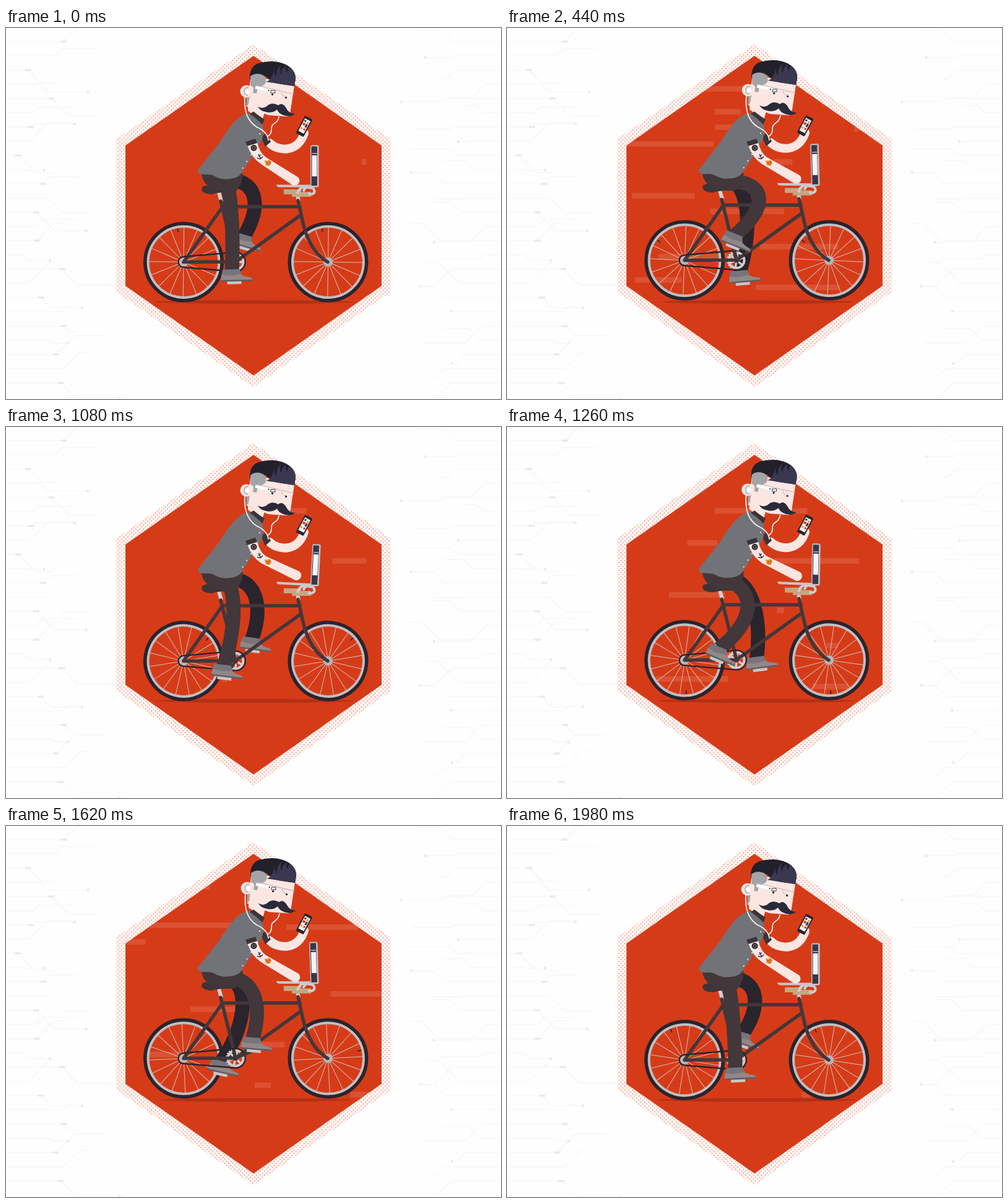
Write an HTML page that moves like this. It is 800 px wide and 600 px high and loops after 2 s.

```html
<!DOCTYPE html>
<html lang="en">
<head>
<meta charset="utf-8">
<title>Cyclist</title>
<style>
html, body { margin: 0; width: 100%; height: 100%; overflow: hidden; background: #fefefe; }
svg { display: block; width: 800px; height: 600px; }
.n { fill: none; }
</style>
</head>
<body>
<svg viewBox="0 0 800 600">
<defs>
  <pattern id="dots" width="6.4" height="6.4" patternUnits="userSpaceOnUse">
    <g fill="#f4b5a6"><circle cx="1.6" cy="1.6" r="1.35"/><circle cx="4.8" cy="4.8" r="1.35"/></g>
  </pattern>
  <clipPath id="hex"><path d="M400 45L607 190V417L400 562L193 417V190Z"/></clipPath>
  <g id="foot">
    <path fill="#c9c6c8" d="M-11-2H12V3H-11Z"/>
    <path fill="#77757b" d="M-18-21H9L13-11H-20Z"/>
    <path fill="#928788" d="M-20-13Q-7-9 11-13Q16-9 24-8Q30-7 30-3H-21Z"/>
    <path fill="#625d63" d="M-21-4H30V-1.5H-21Z"/>
  </g>
  <g id="wheel">
    <circle class="n" r="62" stroke="#2a242d" stroke-width="6"/>
    <circle class="n" r="57.4" stroke="#c2bec0" stroke-width="4"/>
    <g id="spokes" stroke="#d0bdb7"></g>
    <circle r="7.5" fill="#b9b5b8"/>
  </g>
</defs>

<g id="circuit" class="n" stroke="#f5f5f5" stroke-width="1.2"></g>
<path fill="url(#dots)" d="M400 26L622 180V427L400 581L178 427V180Z"/>
<path fill="#d63b18" d="M400 45L607 190V417L400 562L193 417V190Z"/>
<g id="streaks" clip-path="url(#hex)" fill="#fff" fill-opacity=".11"></g>
<path id="shadow" fill="#b33016" d="M-165 0Q-135-3 0-3T165 0Q135 3 0 3T-165 0Z"/>
<use id="rear" href="#wheel"/><use id="front" href="#wheel"/>

<path id="legB" class="n" stroke="#2a242d" stroke-width="23"/>
<use id="footB" href="#foot"/>

<g id="bike">
  <g id="ring" class="n" stroke="#cfcbcd"><circle r="12.5" stroke-width="4"/>
    <circle r="15" stroke-width="2" stroke-dasharray="2.4 2.3"/>
    <path stroke-width="3.5" d="M-11 0H11M-5.5-9.5L5.5 9.5M5.5-9.5L-5.5 9.5"/></g>
  <path class="n" stroke="#d2cfd1" stroke-width="6" d="M344 266L348 280M470 266L473 280"/>
  <g class="n" stroke="#42373a" stroke-width="5.5" stroke-linejoin="round" stroke-linecap="round">
    <path d="M347 280L371 378L287 378.5L350 289H475M477 302L371 378"/>
    <path d="M472 279L480 315Q490 360 520 378.5"/>
  </g>
  <path class="n" stroke="#2a242d" stroke-width="2.4" d="M287 370L371 362.5A15.5 15.5 0 0 1 371 394L287 387A8.5 8.5 0 0 1 287 370Z"/>
  <circle cx="371" cy="378.5" r="4" fill="#42373a"/>
  <path fill="#3f3437" d="M317 257Q335 250 352 252L375 259Q374 266 362 266Q345 265 333 269Q318 268 316 262Z"/>
</g>
<path id="crank" class="n" stroke="#42373a" stroke-width="5"/>
<path id="legA" class="n" stroke="#42373a" stroke-width="23"/>
<use id="footA" href="#foot"/>

<g id="body">
  <path fill="#42373a" d="M316 236Q345 232 382 234Q384 248 374 261Q352 266 332 259Q317 250 316 236Z"/>
  <!-- raised arm and phone -->
  <path class="n" stroke="#fbe6e2" stroke-width="14" stroke-linecap="round" d="M426 186C440 200 472 202 482 170"/>
  <path fill="#3a3438" d="M412 176L420 171L428 184L419 192Z"/>
  <g transform="translate(482 159) rotate(28)">
    <rect x="-7" y="-16" width="14" height="32" rx="2" fill="#2a242d"/>
    <path fill="#f6f1f1" d="M-5-12H5V11H-5Z"/>
    <path fill="#d63b18" d="M-4-5H0V-1H-4ZM1 3H4V6H1Z"/>
    <path fill="#e79a2d" d="M1-9H4V-6H1ZM-4 3H-1V6H-4Z"/>
    <path fill="#38374a" d="M1-5H4V1H1ZM-4-10H-1V-7H-4Z"/>
  </g>
  <path fill="#727378" d="M391 138C374 141 359 163 346 184L310 230Q309 237 320 237Q331 236 338 240Q350 247 368 243Q379 240 383 231L398 208L414 180Q419 160 410 143Z"/>
  <path class="n" stroke="#f4f1f1" stroke-width="2.2" stroke-linecap="round" stroke-dasharray="0 12.7" d="M410 171L409 172M396 205L378 234"/>
</g>

<g id="head">
  <path fill="#fbe6e2" d="M391 124L391 134L414 150L418 136Z"/>
  <path fill="#fbe6e2" d="M396 76L466 93L459 139Q458 144 452 143L424 141L389 127Z"/>
  <path fill="#a3a4a8" d="M389 111L394 109L392 123L388 128Z"/>
  <circle cx="388.5" cy="102.5" r="10" fill="#fbe6e2"/>
  <path class="n" stroke="#c1babd" stroke-width="2.6" d="M392 96A6.5 6.5 0 1 0 391 109"/>
  <circle cx="390" cy="103" r="3.8" fill="#fff"/>
  <path fill="#22202b" d="M394 83Q393 62 408 57Q432 50 452 59Q468 67 468 82L466 94L439 90Q425 85 420 78Z"/>
  <path fill="#3a3850" d="M420 87Q430 85 434 64Q432 74 437 79Q436 66 445 60Q440 69 445 75Q444 66 453 61Q450 69 455 72Q454 66 458 64Q468 70 468 82L466 94Z"/>
  <path fill="#a3a4a8" d="M395 78Q404 71 415 76Q422 79 420 89Q414 96 407 95L405 106L399 105Q402 94 395 93Z"/>
  <path class="n" stroke="#fff" stroke-width="5" d="M403 96L436 103"/>
  <path class="n" stroke="#bdb5b8" stroke-width="1.1" d="M406 93L465 107M445 104Q446 110 452 111"/>
  <path class="n" stroke="#38343f" d="M428 101H435V105H428Z"/>
  <g fill="#25212c"><circle cx="424.5" cy="101" r="1.1"/><circle cx="430.5" cy="107.5" r="1.6"/><circle cx="452.5" cy="112.5" r="1.6"/></g>
  <path fill="#2a2a39" d="M407 127Q416 132 422 126Q430 119 440 125Q446 120 452 128Q457 139 467 139Q458 146 446 140Q440 137 438 132Q431 138 421 136Q410 134 407 127Z"/>
</g>
<path fill="#3a3438" d="M394 139L400 135Q410 143 418 148L414 156Q406 147 394 139Z"/>
<path id="wire" class="n" stroke="#f8f5f5" stroke-width="1.7"/>

<!-- handlebar and laptop -->
<g id="desk">
  <path fill="#c3a783" d="M449 261H477V265H493V273H462V269H449Z"/>
  <path class="n" stroke="#cfccce" stroke-width="4" d="M471 268Q474 257 483 257L496 259Q502 266 494 269L488 268M480 264L486 256"/>
  <path id="base" fill="#c9c6c9" d="M437 253.5H500V257.5H442Q437 257 437 253.5Z"/>
  <g id="screen">
    <rect x="492" y="189.5" width="13.5" height="68" rx="2.5" fill="#c5c3c6"/>
    <path fill="#38374a" d="M493.5 191.5H503V255H493.5Z"/>
    <path fill="#f5f3f5" d="M494.5 206H502.5V240H494.5Z"/>
    <path fill="#9a9bb8" d="M494.5 202H502.5V204H494.5Z"/>
  </g>
</g>
<path id="arm" fill="#fbe6e2"/>
<path fill="#3a3438" d="M387 184L403 179L406 186L390 191Z"/>
<circle cx="400.5" cy="194" r="5" fill="#2a242d"/><circle class="n" cx="400.5" cy="194" r="2.5" stroke="#98929a"/>
<path class="n" stroke="#2a2635" stroke-width="1.4" d="M408 204L412 212M406 210Q410 214 415 208M407.500 207.500L412 205"/>
<path fill="#e88a2c" d="M418 214L422 215L426 213L429 218L426 223L420 222Z"/>
<path fill="#c1431c" d="M421 217H423V219H421ZM425 216H427V218H425ZM422 220H426V221H422Z"/>
</svg>
<script>
const $ = id => document.getElementById(id);
const set = (id, name, value) => $(id).setAttribute(name, value);
const move = (id, x, y, a = 0, cx = 0, cy = 0) =>
  set(id, 'transform', `translate(${x} ${y}) rotate(${a} ${cx} ${cy})`);
const rad = a => a * Math.PI / 180;
const clamp = u => Math.min(1, Math.max(0, u));

let seed = 7;
const random = (lo, hi) => {
  seed = seed * 16807 % 2147483647;
  return lo + (hi - lo) * seed / 2147483647;
};

// Faint traces run in from both edges, jog once at 45 degrees and end in a node
let traces = '';
for (let i = 0; i < 50; i++) {
  const side = i % 2, dir = side ? -1 : 1;
  const y = 22 + (i >> 1) * 23, jog = random(-34, 34);
  const x1 = side * 800 + dir * random(15, 100), x2 = x1 + dir * Math.abs(jog);
  const x3 = x2 + dir * random(5, 70);
  traces += `<path d="M${side * 800} ${y}H${x1}L${x2} ${y + jog}H${x3}"/>`;
  if (i % 3 == 0) traces += `<circle cx="${x3}" cy="${y + jog}" r="2.3" fill="#ebebeb" stroke="none"/>`;
  if (i % 4 == 0) traces += `<path d="M${x1 - 5} ${y}h10" stroke="#e9e9e9" stroke-width="3.2"/>`;
}
$('circuit').innerHTML = traces;

let spokes = '<path d="M0-55V-49" stroke="#2a242d" stroke-width="1.7" transform="rotate(-10.9)"/>';
for (let i = 0; i < 16; i++) spokes += `<path d="M0 0V-56" transform="rotate(${i * 22.5})"/>`;
$('spokes').innerHTML = spokes;

// y, resting x, time the front end comes to rest
const streaks = [[94, 312, 400], [131, 336, 260], [156, 225, 627], [159, 418, 679], [183, 190, 430],
  [212, 432, 240], [267, 202, 360], [267, 504, 655], [292, 298, 492], [349, 385, 480],
  [365, 231, 465], [403, 207, 317], [415, 402, 415], [430, 476, 755]];
$('streaks').innerHTML = streaks.map(s => `<rect y="${s[0]}" height="9"/>`).join('');

// Each streak grows leftward for 250 ms, then its tail catches up
function drawStreaks(t) {
  streaks.forEach(([, x, rest], i) => {
    const head = clamp((rest - t) / 250), tail = clamp((rest + 250 - t) / 250);
    const bar = $('streaks').children[i];
    bar.setAttribute('x', x + 150 * head);
    bar.setAttribute('width', 150 * (tail - head));
  });
}

const near = { id: 'A', hip: [355, 247], hub: [373, 382], phase: 97, bend: 25, swing: 23 };
const far = { id: 'B', hip: [364, 246], hub: [375, 384], phase: 282, bend: 25, swing: 6 };

// The pedal circles the hub; foot tilt and knee bend follow its angle
function drawLeg({ id, hip: [hx, hy], hub, phase, bend, swing }, t) {
  const a = phase + t * .36;
  const x = hub[0] + 35 * Math.cos(rad(a)), y = hub[1] + 29.5 * Math.sin(rad(a));
  const tilt = 8 + 17 * Math.cos(rad(a - 220));
  const c = Math.cos(rad(tilt)), s = Math.sin(rad(tilt));
  const dx = x - 3 * c + 18 * s - hx, dy = y - 3 * s - 18 * c - hy;
  const k = (bend + swing * Math.cos(rad(a - 245))) / .75 / Math.hypot(dx, dy);
  const knee = f => `${hx + dx * f + dy * k} ${hy + dy * f - dx * k}`;
  set('leg' + id, 'd', `M${hx} ${hy}C${knee(.12)} ${knee(.55)} ${hx + dx} ${hy + dy}`);
  move('foot' + id, x, y, tilt);
  return [x, y];
}

function draw(time) {
  const loop = time % 2000, t = loop % 1000;
  const bob = 1.5 * Math.cos((t - 20) * Math.PI / 500) - 1.5;

  drawStreaks(t);
  set('shadow', 'transform', `translate(403 443) scale(${1 + bob * .014} 1)`);
  move('bike', 0, bob);
  move('rear', 287, 378.5 + bob, t * .72);
  move('front', 520.5, 378.5 + bob, t * .72);
  move('ring', 371, 378.5, t * .36);

  drawLeg(far, t);
  const [px, py] = drawLeg(near, t);
  set('crank', 'd', `M371 ${378.5 + bob}L${px} ${py}`);

  move('body', 0, bob * .3);
  const hx = -.4 * bob, hy = .7 * bob;
  move('head', hx, hy);
  set('wire', 'd', `M${386 + hx} ${110 + hy}C384 135 391 151 405 160Q423 168 424 182` +
    `M${441 + hx} ${143 + hy}C440 156 428 152 429 164Q429 172 423 175`);

  // The laptop rocks and the typing hand lifts once per loop
  const tilt = 3 * Math.sin(loop * Math.PI / 2000) ** 4;
  const lift = Math.cos(loop * Math.PI / 1000);
  const x = 468.5 - 1.5 * lift, y = 243.5 + 3.5 * lift;
  move('desk', 0, bob * .8);
  move('base', 0, 0, tilt, 498, 256);
  move('screen', 0, 0, tilt + bob * .75, 499, 256);
  set('arm', 'd', `M390 190L406 185Q410 202 420 209L${x + 3} ${y - 7}` +
    `A7.5 7.5 0 0 1 ${x - 4} ${y + 7}L412 220Q397 210 390 190Z`);
}

const begin = performance.now();
function tick() {
  draw(performance.now() - begin);
  requestAnimationFrame(tick);
}
tick();
</script>
</body>
</html>
```
